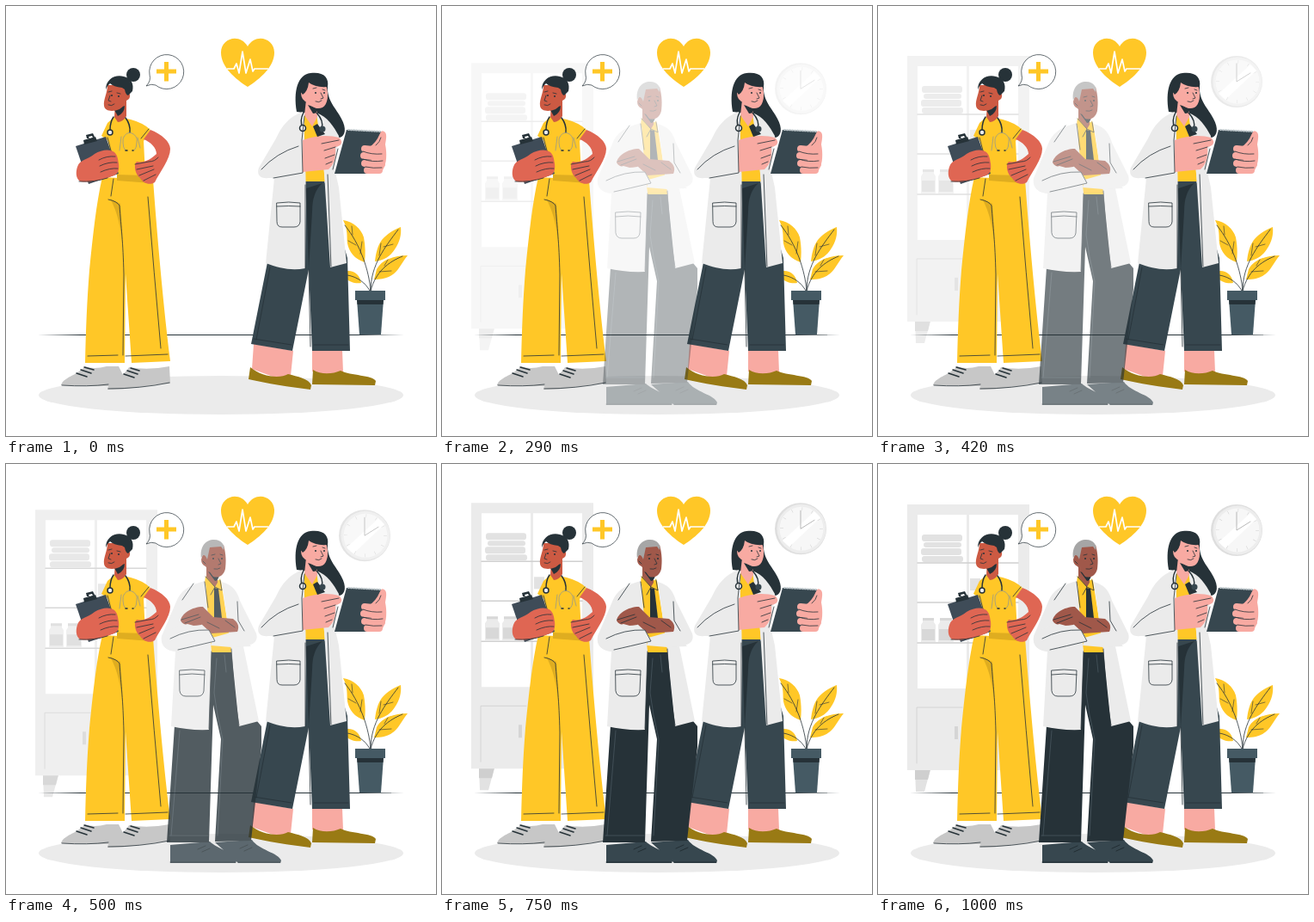
Recreate the animation shown at these times as an HTML page. Size 500 px wide and 500 px high, loop 1.04 s.

```html
<!DOCTYPE html>
<html lang="en">
<head>
<meta charset="utf-8">
<title>Medical team</title>
<style>
html, body { margin: 0; width: 100%; height: 100%; overflow: hidden; background: #fff; }
svg { display: block; width: 100vw; height: 100vh; }
.y { fill: #ffc727; }
.dy { fill: #dfad20; }
.ink { fill: #263238; }
.slate { fill: #37474f; }
.coat { fill: #ebebeb; }
.pale { fill: #e2e2e2; }
.w { fill: #fff; }
.tan { fill: #df6653; }
.face { fill: #cc5a43; }
.pink { fill: #f8aaa2; }
.brown { fill: #a0584a; }
.shoe { fill: #997a14; }
.l { fill: none; stroke: #263238; stroke-width: .8; stroke-linecap: round; stroke-linejoin: round; }
.b { stroke-width: 1.5; }
.g { stroke: #87939a; stroke-width: .7; }
.soft { stroke: #cfcfcf; }
.finger { fill: none; stroke: #f8aaa2; stroke-width: 8; stroke-linecap: round; }
</style>
</head>
<body>
<svg viewBox="0 0 500 500">
  <ellipse class="coat" cx="250" cy="452.5" rx="212" ry="22.5"/>

  <g id="room">
    <path class="pale" d="M43 355h18l-7 26H44z"/>
    <path fill="#cfcfcf" d="M43 355h18l-3 12H43z"/>
    <path class="coat" d="M34 47h142v309H34z"/>
    <path class="w" d="M46 59h57v202H46zM106 59h57v202h-57z"/>
    <path class="l soft b" d="M46 115h117M46 161h117M46 208h117"/>
    <g class="pale">
      <rect x="51" y="82" width="47" height="8" rx="3"/>
      <rect x="53" y="91" width="44" height="6" rx="3"/>
      <rect x="50" y="98" width="47" height="8" rx="3"/>
      <rect x="51" y="107" width="48" height="7" rx="3"/>
      <path d="M107 133h12v14h-12z"/>
    </g>
    <path class="coat" d="M52 180h13v4l2 3v20H50v-20l2-3zM72 180h14v4l2 3v20H70v-20l2-3z"/>
    <path fill="#d8d8d8" d="M51 192h15v13H51zM71 192h16v13H71zM52 179h13v3H52zM72 179h14v3H72z"/>
    <path class="l soft" d="M45 348v-65h53"/>
    <path fill="#d5d5d5" d="M89 305h4v15h-4z"/>
    <circle fill="#dedede" cx="417" cy="77" r="30"/>
    <circle fill="#ededed" cx="418" cy="77" r="28.5"/>
    <circle fill="#f7f7f7" cx="418" cy="77" r="25.5"/>
    <path class="w" d="M396 91l37-34 7 7-36 34z"/>
    <circle class="l soft" cx="418" cy="77" r="23" stroke-dasharray=".5 11.54" style="stroke-width:4;stroke-linecap:butt"/>
    <path class="l" style="stroke:#a8a8a8" d="M417 56v21l16-10"/>
  </g>

  <path class="ink" d="M37 382.5l50-.6h320l56 .6-56 .5H87z"/>

  <g id="plant">
    <path class="y" d="M392 249c12 2 21 10 24 20 2 10 2 20 1 29-12-4-18-12-20-22-1-8 1-15-5-27zM459 257c-8 3-16 8-22 15-5 7-7 16-8 25 10-1 18-6 23-14 6-9 8-17 7-26zM467 290c-16 0-30 5-36 16l-3 12c14 0 22-4 28-12 4-6 7-11 11-16zM396 308c9-1 16 5 17 14-7 1-14-1-17-5z"/>
    <path class="l" d="M424 331c-2-24-12-54-30-76M424 331c0-30 17-51 32-71M424 331c6-22 20-33 37-40M423 331c-5-9-14-16-26-18"/>
    <path class="l" style="stroke-width:.6" d="M407 278l-9-5M412 288l2-14M403 266l-1-10M434 290l2-14M439 280l11-3M434 309l14-1M440 302l4-7"/>
    <path fill="#455a64" d="M408 341h31l-3 41h-25z"/>
    <path class="ink" d="M408 341h31l-.5 6h-30z"/>
    <path fill="#455a64" d="M406 331h35v11h-35z"/>
  </g>

  <g id="nurse">
    <path fill="#c7c7c7" d="M64 441c2-9 18-11 28-22q10 4 25 0h14l7 14-19 9zM118 445c2-8 18-13 25-25q22 4 47-1l1 20c-25 1-42 7-73 7z"/>
    <path class="l" d="M65 441q30 2 54-1M119 445q37 0 71-7"/>
    <path class="l b" d="M82 427l12 4M87 423l12 4M91 420l11 3M137 428l12 4M141 424l12 4M145 421l10 3"/>
    <path class="y" d="M112 199l59 3c3 40 10 130 20 211l-45 2-7-104-1 104H92c1-40 2-70 5-108 4-40 8-78 15-108z"/>
    <path class="dy" d="M121 224l12 6 3 57q-2-40-15-63z"/>
    <path class="dy" d="M129 194h33l9 8-2 4-40-3z"/>
    <path class="l" d="M119 225q10 2 13 7c2 27 4 40 5 80l-1 94M125 201l-3 20M165 222q7 87 15 176M95 407l35-1M139 407l49-2"/>
    <path class="y" d="M127 128l-9 8-7 15 7 5 11 40 33 1-2-40 8-13q-8-8-23-12z"/>
    <path class="tan" d="M160 155l8-11c13 5 23 14 23 22 0 12-12 27-18 39-6 4-14 1-17-5-6-4-8-16-4-19 8 2 17-3 23-9 0-7-7-14-15-17z"/>
    <path class="l" d="M150 184l16-3q7 0 11-5M152 190l19-4M155 197l17-7M160 203l14-7M157 154l9-11"/>
    <path class="face" d="M127 114l13-7v21q-4 7-10 7l-4-6z"/>
    <path class="ink" d="M126 121l12-5q0 8-8 12z"/>
    <path class="face" d="M118 92c0 9-5 17-4 24 1 7 11 7 18 4q5-3 8-10 5-2 4-7l-6-11z"/>
    <circle class="ink" cx="148" cy="80" r="8"/>
    <path class="ink" d="M116 97c0-12 11-18 21-15 9 2 12 9 10 17l-5 5q-3-1-4-7l-3-2q-10-1-14-5-3 2-5 7z"/>
    <path class="l" d="M119 100l4-1M129 101l4 1M121 104l-2 6 3 1M119 115q4 2 7-1"/>
    <circle class="ink" cx="123" cy="104" r="1"/><circle class="ink" cx="131" cy="105" r="1"/>
    <path class="l b" d="M125 129q-4 6-4 15M139 130q6 8 5 17"/>
    <path class="l g" d="M144 147q-9 2-8 12 0 6 3 9M144 147q10 3 8 12 0 6-3 9M134 152l-2 16M153 153l3 12"/>
    <circle class="coat" cx="121" cy="147" r="3" stroke="#263238" stroke-width="1.5"/>
    <path class="l b" d="M139 168h2M147 168h1"/>
    <path fill="#3f4c58" d="M81 163l35-11 15 43-35 12z"/>
    <path class="ink" d="M90 156l14-4 2 5-15 4zM94 154l-1-4 8-2 2 4-2 1-1-2-4 1 1 2z"/>
    <path class="tan" d="M83 187c3-9 12-8 20-15 8-5 18-6 23-2 4 4 4 8 5 13 1 9-1 13-8 15-10 4-25 8-37 6-5-4-5-11-3-17z"/>
    <path class="l" d="M108 179q9-5 19-4M109 186q10-5 20-4M110 193q11-5 20-4M85 204q18 1 33-4M118 153l4 15"/>
  </g>

  <g id="bubble">
    <path class="w" stroke="#263238" stroke-width=".7" d="M163 93q6-6 4-13a20 20 0 1 1 7 12q-5-2-11 1z"/>
    <path class="y" d="M184 65h5v8.500h9v5h-9v9h-5v-9h-9v-5h9z"/>
  </g>
  <g id="heart">
    <path class="y" d="M281 94C267 85 250 71 250 54c0-17 22-23 31-7 9-16 31-10 31 7 0 17-17 31-31 40z"/>
    <path fill="none" stroke="#fff" stroke-width="1.700" stroke-linejoin="round" d="M257 73h8l3-6 3 11 4-25 4 25 5-16 3 14 2-3h16"/>
  </g>

  <g id="doctor">
    <path class="pink" d="M288 393l46 8-3 29-18 2-27-10zM356 400h35l1 26-17 4-19-5z"/>
    <path class="shoe" d="M284 420c13 11 34 14 44 8 11 3 24 5 27 13l-1 5c-25-3-50-7-72-12zM357 423c9 6 23 5 32 1 12 6 37 5 41 12l-1 5-73-1z"/>
    <path class="slate" d="M346 203h24l27 90 3 108h-44l-4-95-19 95-48-8 19-95z"/>
    <path class="ink" d="M349 212l19-6q-12 10-12 33l-4 67z"/>
    <path class="l" d="M307 304l-16 84M288 387l44 7M352 306l2 90M359 212q-1 12-6 17M358 394h40"/>
    <path class="ink" d="M338 123c-4-24 1-43 16-45 15-2 22 5 20 16-1 16 10 25 16 37 6 11 5 20-2 22-10-5-18-18-24-27z"/>
    <path class="y" d="M347 126l18 3 6 75h-25z"/>
    <path class="coat" d="M345 123c-17 6-25 18-31 31l-20 34c-3 9 2 13 12 12h6l-10 99c16 6 30 9 46 6l1-75-1-60z"/>
    <path class="coat" d="M361 124c13 5 20 16 26 27l-5 38 5 22 9 88-19 5-7-109z"/>
    <path class="pink" d="M349 109l13 6v14l-6 11-9-13z"/>
    <path class="ink" d="M351 115l12 4q-1 6-6 6z"/>
    <path class="pink" d="M349 88l23 4c4 11 2 23-4 26-7 3-13-1-17-6q-8-2-8-11 1-6 6-13z"/>
    <path class="ink" d="M341 98c2-15 19-20 32-8v4q-13 1-21-5-1 10-7 14z"/>
    <path class="l" d="M357 96l4-1M368 97l3 1M366 101l3 6-3 1M360 111q4 2 7-1"/>
    <circle class="ink" cx="360" cy="101" r="1"/><circle class="ink" cx="370" cy="101" r="1"/>
    <path class="l b" d="M346 124q-5 9-1 18M361 124q9 10 6 18"/>
    <circle class="coat" cx="345" cy="142" r="3.500" stroke="#263238" stroke-width="1.500"/>
    <path class="pink" d="M345 156c15-6 32-6 42-3 6 5 3 10-4 11 1 11-1 20-8 26l-30 3z"/>
    <path class="slate" d="M396 144l41 2-8 49h-47z"/>
    <path class="l" stroke-dasharray="1 2" d="M398 144l38 2" style="stroke:#bcc5c9;stroke-width:2"/>
    <path class="ink" d="M357 140l5-3 9 12-9 3z"/>
    <circle class="slate" cx="368" cy="143" r="3.500"/>
    <path class="l" d="M367 160l20-4M370 168l13-4M371 177l11-4M372 184l7-3M347 128l-3 28 1 38-34 6M297 190q17-19 43-27M348 208v97M374 196l4 107M386 166l-6 24"/>
    <path class="pink" d="M441 147c2 3 1 8 0 14 2 10 2 22-3 30l-10 3-6-30q8-4 13-16 2-5 6-1z"/>
    <path class="finger" d="M417 166l19 2M416 174l21 2M417 183l20 1M420 191l14 0"/>
    <path class="l" d="M415 169q10 4 22 3M415 178q11 4 23 2M418 187q9 2 19 1M430 162q5-4 6-9"/>
    <path class="l" d="M315 229q14-2 27 0v22q-1 6-7 6h-14q-6 0-6-6zM315 233q14-1 27 0"/>
  </g>

  <g id="man">
    <path class="slate" d="M191 443l46-4c8 8 28 13 31 22l-1 3-76 0zM243 440l43-3c8 12 31 15 34 24l-1 3h-49z"/>
    <path class="l" style="stroke:#1d282d" d="M191 463h76M270 463h49M223 448l9-4M228 451l9-4M272 447l9-4M277 450l9-4"/>
    <path class="ink" d="M238 217h24l30 82 5 6v24l-12 109-42 1 7-119-9-40-5 160h-49l9-136z"/>
    <path class="l g" style="stroke:#4d5b63" d="M202 310l-10 122M245 226l-3 40q3 25 10 54l-6 112M254 222l2 20M190 432h45"/>
    <path class="y" d="M232 131l18 5 13 83h-28z"/>
    <path class="brown" d="M233 118l13 9v12l-4 6-9-9z"/>
    <path class="ink" d="M235 125l13 5q-2 6-5 6z"/>
    <path class="y" d="M232 130l11 13-5 9-7-14zM249 133l2 15-8-5z"/>
    <path class="l" d="M232 131l11 12-5 9M249 135l2 12-8-4"/>
    <path class="ink" d="M242 144l5 1 4 34h-9z"/>
    <path class="coat" d="M231 136c-18 5-28 11-33 24l-17 40c-2 11 5 17 16 18l-5 87q21 5 44 4l3-91z"/>
    <path class="coat" d="M251 137c14 4 18 12 21 22l19 38c3 10-5 14-15 15l18 87-23 6-9-88z"/>
    <path class="coat" d="M240 202l28-8 17 18-23 1-24-2z"/>
    <path class="brown" d="M203 182c1-8 13-16 26-16l12 12-14 9c-12 2-21 1-24-5z"/>
    <path class="brown" d="M226 185l15-7 23 2c7 5 7 10 5 15l-30 2z"/>
    <path class="coat" d="M184 194l27-8 25 7 8 13-44 12c-13 0-19-6-19-14z"/>
    <path class="l" d="M200 216q18-4 43-10l-7-13q-24-1-45 10M231 137l4 30M269 160l1 22 7 12M239 218l-3 90M262 215q3 55 9 89M204 181l20-6M208 185l18-7M234 184l14 7M255 182l11 8M218 139l-13 19"/>
    <path class="l" d="M202 240q14-2 29 0l-1 24q-1 6-7 6h-14q-6 0-7-6zM202 245q14-2 29 0"/>
    <path class="brown" d="M232 96l21-2c3 11 3 20 2 28-2 8-8 11-14 9l-9-12q-5-2-5-8z"/>
    <path fill="#a6a6a6" d="M227 110c-2-14 5-22 15-22 9 0 13 7 11 12l-3-4-13 1-3 14q-2-5-4-5-2 0-3 4z"/>
    <path class="l" d="M239 106l4-1M249 105l3 1M247 110l3 6-3 1M242 122q4 1 7-1M229 113l3 3"/>
    <circle class="ink" cx="241" cy="110" r="1"/><circle class="ink" cx="251" cy="110" r="1"/>
  </g>
</svg>
<script>
const LOOP = 1040, RISE = 30, LEAD = 25;
const room = document.getElementById('room');
const man = document.getElementById('man');
const bezier = (a, b, u) => 3 * (1 - u) ** 2 * u * a + 3 * (1 - u) * u * u * b + u ** 3;

// Easing with an overshoot near the end; u is found by bisection.
function ease(x) {
  let low = 0, high = 1;
  for (let i = 0; i < 24; i++) {
    const mid = (low + high) / 2;
    if (bezier(.36, .5, mid) < x) low = mid; else high = mid;
  }
  return bezier(-.01, 1.38, low);
}

function draw() {
  const time = performance.now() % LOOP;
  const p = ease(Math.min(1, (time + LEAD) / 1000));
  const alpha = Math.max(0, Math.min(1, p));
  room.setAttribute('transform', `translate(0 ${RISE * (1 - p)})`);
  room.setAttribute('opacity', alpha);
  man.setAttribute('opacity', alpha);
  requestAnimationFrame(draw);
}
draw();
</script>
</body>
</html>
```
